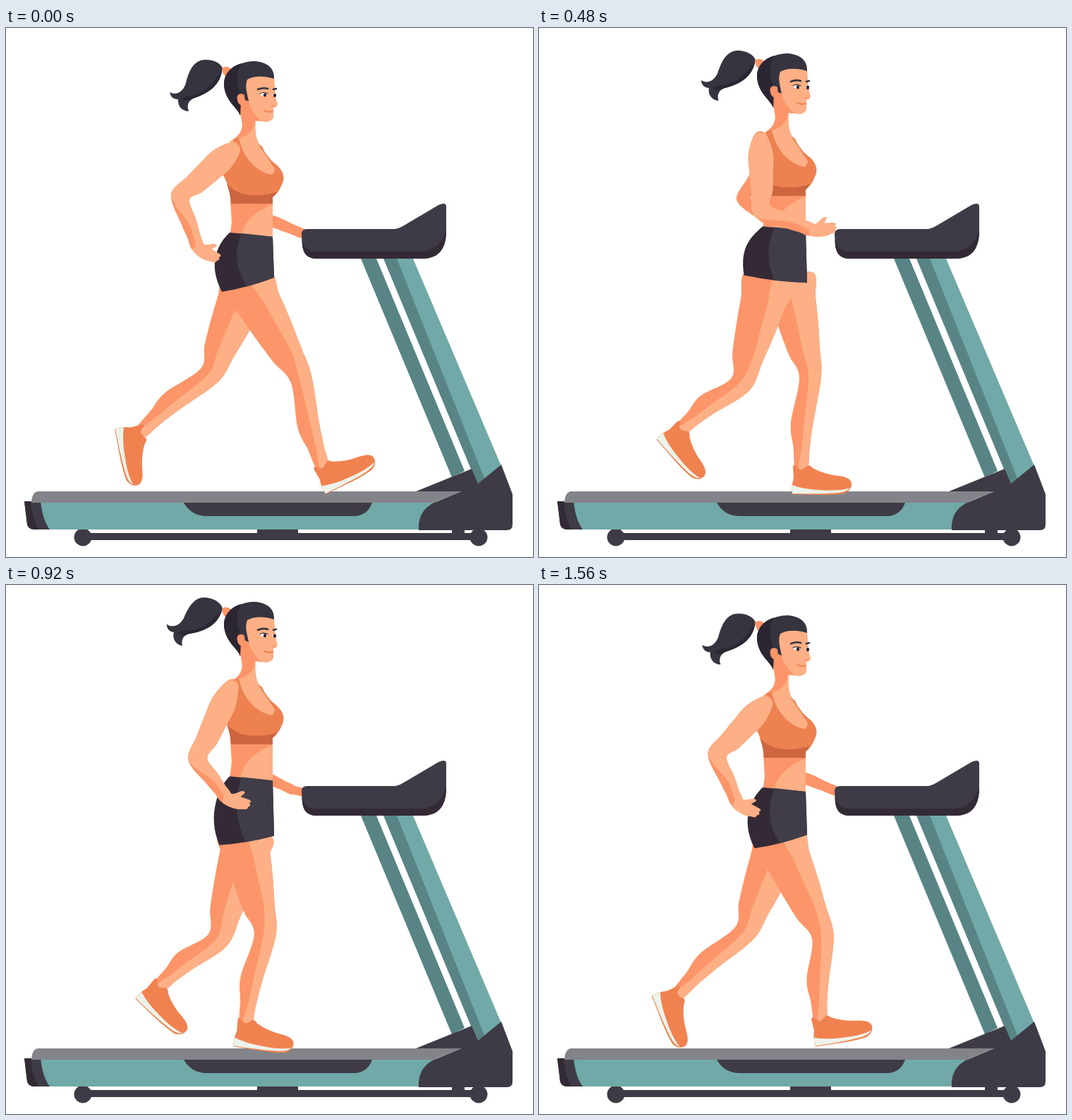
Recreate the animation shown at these times as an HTML page with a canvas. Size 747x750 px, loop 1600 ms.

```html
<!DOCTYPE html>
<html lang="en">
<head>
<meta charset="utf-8">
<title>Treadmill</title>
<style>
html, body { margin: 0; width: 100%; height: 100%; overflow: hidden; background: #fff; }
canvas { display: block; }
</style>
</head>
<body>
<canvas id="stage" width="747" height="750"></canvas>
<script>
const ctx = document.getElementById('stage').getContext('2d');
const CYCLE = 800, STEP = 40;
const { PI, sin, cos, abs, min, sqrt, hypot } = Math;
const C = {
  light: '#fdaf85', dark: '#fc9569', top: '#ed8150', topDark: '#cd6640',
  cloth: '#403d48', clothDark: '#342a36', hair: '#35343f', hairDark: '#2c2633',
  teal: '#70a9a8', tealDark: '#588486', metal: '#3f3b46', belt: '#828489',
  shoe: '#f08250', sole: '#ecf3ea'
};

// Key poses of one stride; the other leg runs half a cycle later
const STRIDE = [
  { t: 0, knee: [418, 498], ankle: [449, 626], foot: -27 },
  { t: 80, knee: [384, 495], ankle: [371, 628], foot: 0 },
  { t: 280, knee: [302, 500], ankle: [223, 597], foot: 34 },
  { t: 400, knee: [288, 492], ankle: [189, 574], foot: 78 },
  { t: 480, knee: [285, 505], ankle: [199, 570], foot: 48 },
  { t: 680, knee: [373, 490], ankle: [297, 580], foot: 27 },
  { t: 760, knee: [402, 500], ankle: [398, 620], foot: -10 }
];
const NEAR_ARM = {
  back: { elbow: [247, 240], wrist: [272, 312], hand: 28 },
  front: { elbow: [322, 261], wrist: [396, 285], hand: -10 }
};
const FAR_ARM = {
  back: { elbow: [276, 238], wrist: [318, 283], hand: 35 },
  front: { elbow: [350, 262], wrist: [424, 293], hand: 8 }
};

const lerp = (a, b, u) => a + (b - a) * u;
const mix = (p, q, u) => [lerp(p[0], q[0], u), lerp(p[1], q[1], u)];

// Cyclic Hermite spline through the stride poses
function stride(t) {
  t %= CYCLE;
  const n = STRIDE.length, i = STRIDE.findLastIndex(k => k.t <= t);
  const pose = k => STRIDE[(k + n) % n];
  const time = k => pose(k).t + Math.floor(k / n) * CYCLE;
  const d = time(i + 1) - time(i), u = (t - time(i)) / d, v = 1 - u;
  const ease = get => {
    const val = k => get(pose(k));
    const slope = k => (val(k + 1) - val(k - 1)) / (time(k + 1) - time(k - 1));
    return lerp(val(i), val(i + 1), u * u * (3 - 2 * u)) + d * u * v * (v * slope(i) - u * slope(i + 1));
  };
  return {
    knee: [0, 1].map(k => ease(p => p.knee[k])),
    ankle: [0, 1].map(k => ease(p => p.ankle[k])),
    foot: ease(p => p.foot)
  };
}

// The body rises twice per cycle
function lift(t) {
  const a = 4 * PI * t / CYCLE;
  return -(15 * (1 - cos(a)) + 2.3 * sin(a) - 2.5 * sin(2 * a));
}

// Limb outlines: s runs 0..1 to the joint and 1..2 to the end
const thigh = s => 16 + 18 * cos(PI * s / 2);
const legShape = shade => ({
  start: .1,
  back: s => s < 1 ? thigh(s) : 15 - 8 * (s - 1) + 12 * sin(PI * sqrt(s - 1)),
  front: s => s < 1 ? thigh(s) : 9 + 7 * (2 - s) ** 2,
  shade: s => s < 1 ? shade : -2
});
const armShape = size => {
  const width = s => size * (19 - 5.5 * s) * sqrt(min(1, (s + .25) / .4));
  return { start: -.2, back: width, front: width, shade: s => -14 * (2 - s) ** 4 };
};

function fill(shape, color) {
  ctx.fillStyle = color;
  ctx.fill(typeof shape === 'string' ? new Path2D(shape) : shape);
}

function line(d, color, width) {
  ctx.strokeStyle = color;
  ctx.lineWidth = width;
  ctx.lineCap = 'round';
  ctx.stroke(new Path2D(d));
}

function placed(x, y, deg, draw) {
  ctx.save();
  ctx.translate(x, y);
  ctx.rotate(deg * PI / 180);
  draw();
  ctx.restore();
}

// Smooth closed curve through points
function blob(pts) {
  const p = new Path2D(), n = pts.length, g = k => pts[(k + n) % n];
  p.moveTo(...pts[0]);
  for (let i = 0; i < n; i++) {
    const [a, b, c, d] = [g(i - 1), g(i), g(i + 1), g(i + 2)];
    p.bezierCurveTo(b[0] + (c[0] - a[0]) / 6, b[1] + (c[1] - a[1]) / 6,
      c[0] - (d[0] - b[0]) / 6, c[1] - (d[1] - b[1]) / 6, c[0], c[1]);
  }
  p.closePath();
  return p;
}

function unit([x, y]) {
  const l = hypot(x, y);
  return [x / l, y / l];
}

function limb(a, b, c, shape, base, lit) {
  const n1 = unit([b[1] - a[1], a[0] - b[0]]), n2 = unit([c[1] - b[1], b[0] - c[0]]);
  const joint = unit([n1[0] + n2[0], n1[1] + n2[1]]);
  const point = (s, off) => {
    const p = s < 1 ? mix(a, b, s) : mix(b, c, s - 1);
    const n = s === 1 ? joint : s < 1 ? n1 : n2;
    return [p[0] + n[0] * off, p[1] + n[1] * off];
  };
  const stops = [];
  for (let i = 0; i < 4; i++) stops.push(lerp(shape.start, 1, i / 4));
  for (let i = 0; i <= 4; i++) if (i !== 1) stops.push(1 + i / 4);
  const edge = off => stops.map(s => point(s, off(s)));
  const outline = blob([...edge(s => -shape.back(s)), ...edge(shape.front).reverse()]);
  fill(outline, base);
  if (!lit) return;
  ctx.save();
  ctx.clip(outline);
  fill(blob([...edge(shape.shade), ...edge(s => shape.front(s) + 10).reverse()]), lit);
  ctx.restore();
}

function shoe() {
  fill('M-11-5C-10-11-7-9-5-5Q0 2 10-8Q14-8 17-4Q34 5 54 7Q70 9 72 17Q73 27 62 32Q50 34 30 34L-12 33Q-14 24-10 10Z', C.shoe);
  fill('M-12 20Q4 26 28 27Q54 29 70 24Q65 30 52 31Q30 33-12 32Q-13 26-12 20Z', C.sole);
}

function leg(t, hip, shape) {
  const { knee, ankle, foot } = stride(t);
  limb(hip, knee, ankle, shape, C.dark, C.light);
  placed(...ankle, foot, shoe);
}

function arm({ back, front }, t, shoulder, shape, lit) {
  const u = abs(sin(PI * t / CYCLE)) ** 1.4;
  const wrist = mix(back.wrist, front.wrist, u);
  limb(shoulder, mix(back.elbow, front.elbow, u), wrist, shape, C.dark, lit);
  placed(...wrist, lerp(back.hand, front.hand, u), () => fill(lit
    ? 'M-5-8C3-7 8-9 13-13C18-18 24-17 22-14L18-8L31-7C35-6 35-4 32-3C35-1 35 2 32 3C33 6 30 8 26 8C18 12 5 11-5 7Z'
    : 'M-5-6C8-7 22-6 26-2C26 5 15 7-5 5Z', lit || C.dark));
}

function machine() {
  fill('M503 327H525L650 628L632 637Z', C.tealDark);
  fill('M535 327H556L684 636L668 647Z', C.tealDark);
  fill('M554 327H577L702 621L681 646Z', C.teal);
  fill('M104 716H676V726H104ZM356 710H414V717H356ZM632 710H650V717H632Z', C.metal);
  for (const x of [109, 670]) {
    ctx.beginPath();
    ctx.arc(x, 722, 12.5, 0, 2 * PI);
    ctx.fill();
  }
  fill('M46 672H640V711H58Z', C.teal);
  fill('M26 671H49Q52 698 62 711H40Q32 711 30 704Z', C.metal);
  fill('M26 671H35Q37 695 46 711H40Q32 711 30 704Z', C.clothDark);
  fill('M252 673H519Q513 690 496 692H283Q262 691 252 673Z', C.metal);
  fill('M581 657L660 625L669 646L702 619L718 661V704Q718 712 710 712H585C584 690 594 677 614 670L645 657Z', C.metal);
  fill('M36 673Q37 657 46 657H645L606 673Z', C.belt);
}

function consolePanel() {
  fill('M419 292Q419 285 427 285H552Q558 284 564 280L613 251Q624 246 624 253V292Q622 326 592 327H440Q422 327 420 308Z', C.metal);
  fill('M419 298Q422 317 440 317H590Q616 314 624 286V292Q622 326 592 327H440Q422 327 420 308Z', C.clothDark);
}

function torso() {
  fill('M319 240L320 275L315 315H378V238Z', C.light);
  fill('M318 245H378V250Q340 264 332 296V315H315L320 275Z', C.dark);
  fill('M331 110L335 138Q334 152 318 160L310 190L330 215L380 212L381 195L360 166Q352 156 354 130Z', C.light);
  fill('M331 110L335 138Q334 150 324 157L332 156Q347 151 352 138L353 128Z', C.dark);
  fill('M323 157L330 156Q335 180 352 196Q366 207 377 208Q382 203 380 198L357 164L363 168Q368 182 381 192C394 202 396 213 391 222Q387 233 378 240V249H319Q318 225 306 205Z', C.top);
  fill('M313 221Q328 237 352 237Q372 237 385 232Q381 238 378 240V249H319Q318 235 313 221Z', C.topDark);
}

function head(tail) {
  placed(307, 58, tail, () => {
    fill('M0-1C-4-11-20-15-31-12C-44-8-49 8-52 20C-56 33-66 38-75 33C-73 41-69 43-63 43C-64 52-58 60-48 60C-51 52-49 46-42 42C-24 36-4 26 0-1Z', C.hair);
    fill('M-1 3C-12 14-16 26-31 33C-44 39-54 38-58 43C-54 45-47 46-42 42C-24 36-4 26-1 3Z', C.hairDark);
  });
  fill('M306 57Q313 52 319 58L314 70Q307 68 306 57Z', C.dark);
  fill('M338 72Q360 64 380 71L382 95Q383 103 385 108Q384 112 379 113L379 127Q376 133 368 133Q350 132 334 124Z', C.light);
  fill('M333 92L343 102Q347 120 362 132Q344 132 331 123Z', C.dark);
  fill('M332 124C328 112 309 103 309 78C310 58 334 47 352 47C370 48 381 57 380 72C364 67 351 68 342 73C338 83 342 93 344 104L339 102L333 94Z', C.hair);
  fill('M332 124C328 112 309 103 309 78C310 62 322 53 334 50C325 62 326 80 333 94Z', C.hairDark);
  fill('M338 95C332 91 326 94 328 102C329 109 335 112 339 108Z', C.dark);
  line('M357 87Q364 84 371 86M379 87L383 86', C.hair, 2.6);
  fill('M359 93Q365 90 371 95Q364 99 359 93ZM377 95Q381 92 383 95L382 98Z', '#fff');
  line('M367 94.5V95.5M381 95V96', C.hairDark, 4.2);
  line('M360 93Q365 90 371 93', C.hairDark, 1.2);
  line('M366 117Q371 120 378 118', C.top, 2);
  line('M377 110L382 111', C.dark, 2);
}

function shorts(swing, bob) {
  const y = 290 + bob * .8;
  const [lx, ly] = [297.5 + 8.5 * swing, 361 + 13 * swing], [rx, ry] = [380, 358 - 4 * swing];
  const [mx, my] = mix([lx, ly + 2], [rx, ry + 2], .48);
  fill(`M317 ${y}C302 ${y + 14} 284 ${ly - 42} ${lx} ${ly}Q${mx} ${my + 2} ${rx} ${ry}L378 ${y + 6}Z`, C.clothDark);
  fill(`M334 ${y + 1}Q317 ${(y + my) / 2} ${mx} ${my}L${rx} ${ry}L378 ${y + 6}Z`, C.cloth);
}

function draw(t) {
  const half = t + CYCLE / 2, bob = lift(t), sink = bob / 2;
  ctx.fillStyle = '#fff';
  ctx.fillRect(0, 0, 747, 750);
  machine();
  arm(FAR_ARM, half, [338, 178 + bob], armShape(.75));
  consolePanel();
  leg(half, [350, 343 + sink], legShape(-2));
  leg(t, [332, 343 + sink], legShape(7));
  placed(0, bob, 0, torso);
  shorts(cos(2 * PI * t / CYCLE), bob);
  placed(0, bob, 0, () => head(-.4 * bob));
  arm(NEAR_ARM, t, [314, 179 + bob], armShape(1), C.light);
}

const start = performance.now();
function tick() {
  const t = Math.max(0, performance.now() - start);
  draw(Math.floor(t / STEP) * STEP % CYCLE);
  requestAnimationFrame(tick);
}
tick();
</script>
</body>
</html>
```
